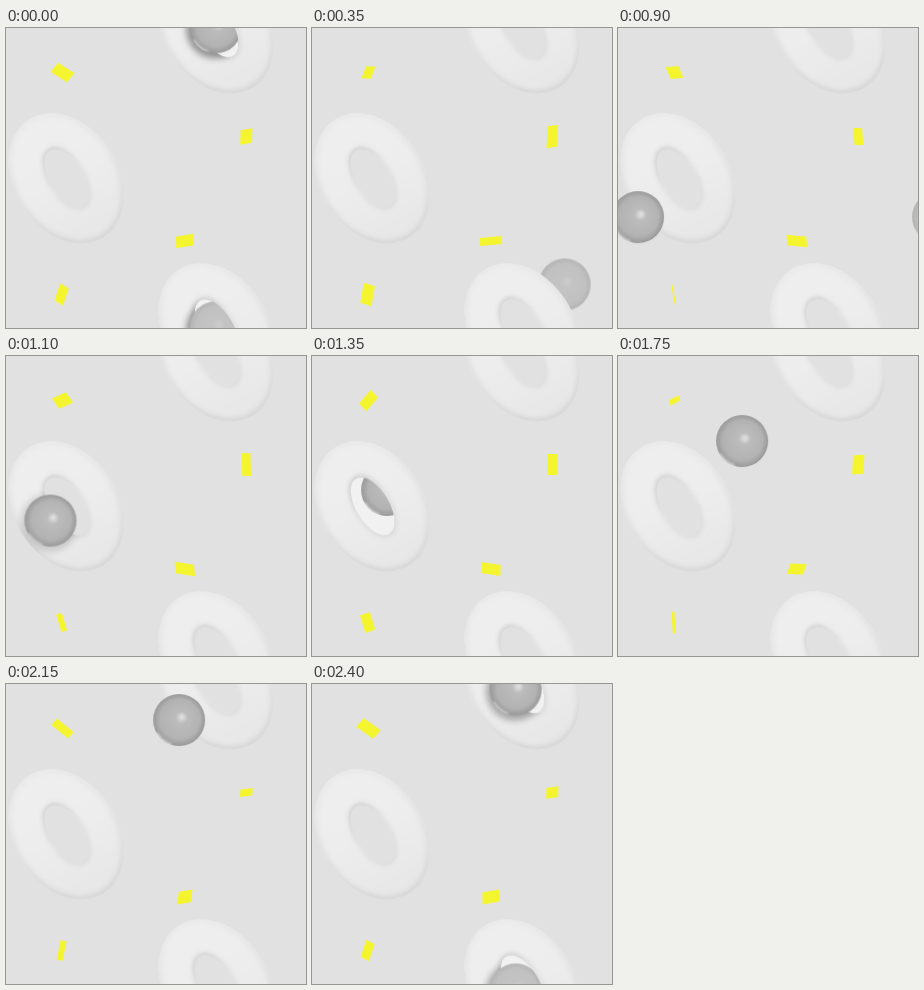
An HTML page with a canvas that plays this animation: 300 by 300 pixels, repeating every 2.45 s.

```html
<!DOCTYPE html>
<html lang="en">
<head>
<meta charset="utf-8">
<title>Rings and sphere</title>
<style>
html, body { margin: 0; width: 100%; height: 100%; overflow: hidden; background: #e1e1e1; }
canvas { display: block; width: 300px; height: 300px; }
</style>
</head>
<body>
<canvas id="stage" width="300" height="300"></canvas>
<script>
const SIZE = 300, LOOP = 2450, STEP = 50, R = 26;
const BG = '#e1e1e1', YELLOW = '#f5f52f';
const ctx = document.getElementById('stage').getContext('2d');
const rad = deg => deg * Math.PI / 180;

// Ring geometry, relative to the ring centre
const outer = new Path2D(), hole = new Path2D(), ring = new Path2D();
outer.ellipse(0, 0, 69.4, 52, rad(57.4), 0, 7);
hole.ellipse(.7, -.3, 32.4, 16.6, rad(59), 0, 7);
ring.addPath(outer);
ring.addPath(hole);

function sprite(size, draw) {
  const c = document.createElement('canvas');
  c.width = c.height = size;
  const g = c.getContext('2d');
  g.translate(size / 2, size / 2);
  draw(g);
  return c;
}

function gradient(g, x, y, ...stops) {
  const fill = g.createLinearGradient(-x, -y, x, y);
  stops.forEach((color, i) => fill.addColorStop(i / (stops.length - 1), color));
  return fill;
}

function softStroke(g, path, color, width, blur) {
  g.filter = `blur(${blur}px)`;
  g.strokeStyle = color;
  g.lineWidth = width;
  g.stroke(path);
  g.filter = 'none';
}

const ringImage = sprite(150, g => {
  g.clip(ring, 'evenodd');
  g.fillStyle = gradient(g, 30, 60, '#efefef', '#ededed', '#e7e7e7');
  g.fillRect(-75, -75, 150, 150);
  softStroke(g, outer, gradient(g, 15, 66, '#e8e8e8', '#dedede', '#d0d0d0'), 5, 2.5);
  softStroke(g, hole, gradient(g, 25, 25, '#c8c8c8', '#dedede', '#d6d6d6'), 4, 2);
});

// The half of the ring that leans towards the viewer
const nearImage = sprite(150, g => {
  g.rotate(rad(58));
  g.beginPath();
  g.rect(-75, -75, 150, 75);
  g.clip();
  g.rotate(-rad(58));
  g.drawImage(ringImage, -75, -75);
});

function ball(shine, core, mid, edge, glint) {
  return sprite(60, g => {
    const fill = g.createRadialGradient(3, -3, 1, 0, 0, R);
    fill.addColorStop(0, shine);
    fill.addColorStop(.2, core);
    fill.addColorStop(.75, mid);
    fill.addColorStop(1, edge);
    g.fillStyle = fill;
    g.beginPath();
    g.arc(0, 0, R, 0, 7);
    g.fill();
    g.clip();
    const rim = new Path2D();
    rim.arc(0, 0, R, rad(108), rad(150));
    softStroke(g, rim, glint, 2.5, 1);
  });
}
const darkBall = ball('#dedede', '#bcbcbc', '#b3b3b3', '#999999', 'rgba(250,250,250,.7)');
const paleBall = ball('#cccccc', '#c4c4c4', '#c1c1c1', '#b4b4b4', 'rgba(220,220,220,.5)');

// Confetti: the two edges of a tumbling rectangle, as harmonics of one turn.
// c, s belong to the turn angle; c2, s2 to its double.
const confetti = [
  { x: 56.5, y: 44.5, edges: (c, s, c2, s2) => [
    12.3 + 1.5 * c - 1.2 * s + 2.5 * (c2 - s2), 10.5 * c - 6 * s2,
    -7.7 * c, 9 + 3.8 * s] },
  { x: 240.3, y: 108.5, edges: (c, s, c2, s2) => [
    10.5 + 1.3 * c - 1.2 * s, -.8 - c,
    -.3 - 1.3 * s, -5.5 + 18.5 * c + 11.5 * s + 1.5 * c2 + 7.5 * s2] },
  { x: 178.8, y: 213, edges: (c, s, c2, s2) => [
    18.5 - c + 3.3 * s + 1.8 * s2, -3 * c,
    -.6 + 2 * s + 1.2 * c2, 10.5 - 1.5 * s + c2 - 1.2 * s2] },
  { x: 55.6, y: 266.5, edges: (c, s, c2, s2) => [
    2.3 + 8.6 * c + 5 * s - 2.3 * c2 - s2, 2 + c + 2 * c2 + 1.2 * s2,
    -5.7 * c, 19.5 - 2.5 * c2] }
];

function drawConfetti({ x, y, edges }, turn) {
  const { cos, sin } = Math;
  const [ux, uy, wx, wy] = edges(cos(turn), sin(turn), cos(2 * turn), sin(2 * turn));
  ctx.fillStyle = YELLOW;
  ctx.beginPath();
  for (const [a, b] of [[-.5, -.5], [.5, -.5], [.5, .5], [-.5, .5]]) {
    ctx.lineTo(x + a * ux + b * wx, y + a * uy + b * wy);
  }
  ctx.fill();
}

// "pass" is the moment the sphere crosses the ring
const rings = [
  { x: 60, y: 150.5, pass: LOOP / 2 },
  { x: 210, y: .5, pass: 0 },
  { x: 210, y: 300.5, pass: 0 }
];

// The far side of a ring, lit and shaded by the sphere going through it
function drawRing({ x, y, pass }, t) {
  const since = (t - pass + LOOP * 1.5) % LOOP - LOOP / 2;
  const shift = SIZE * since / LOOP;
  ctx.save();
  ctx.translate(x, y);
  if (since > -120 && since < 260) {
    ctx.fillStyle = '#f1f1f1';
    ctx.fill(hole);
  }
  ctx.drawImage(ringImage, -75, -75);
  const shade = 1 - Math.abs(since) / 200;
  if (shade > 0) {
    ctx.clip(ring, 'evenodd');
    ctx.filter = 'blur(3px)';
    ctx.fillStyle = `rgba(90,90,90,${.6 * shade})`;
    ctx.beginPath();
    ctx.arc(shift - 1, 1 - shift, R + 3, 0, 7);
    ctx.fill();
  }
  ctx.restore();
}

function draw(t) {
  ctx.fillStyle = BG;
  ctx.fillRect(0, 0, SIZE, SIZE);
  for (const r of rings) drawRing(r, t);

  // One sphere drifts up and right; its copies wrap around the stage
  const d = SIZE * t / LOOP;
  const x = 209.8 + d, y = 299.3 - d;
  const put = (image, px, py) => ctx.drawImage(image, px - 30, py - 30);
  put(paleBall, x, y);
  put(paleBall, x - SIZE, y + SIZE);
  put(darkBall, x - SIZE, y);
  put(darkBall, x, y - SIZE);

  for (const r of rings) ctx.drawImage(nearImage, r.x - 75, r.y - 75);
  for (const piece of confetti) drawConfetti(piece, 2 * Math.PI * t / LOOP);
}

function tick() {
  const t = performance.now() % LOOP;
  draw(Math.floor(t / STEP) * STEP);
  requestAnimationFrame(tick);
}
tick();
</script>
</body>
</html>
```
